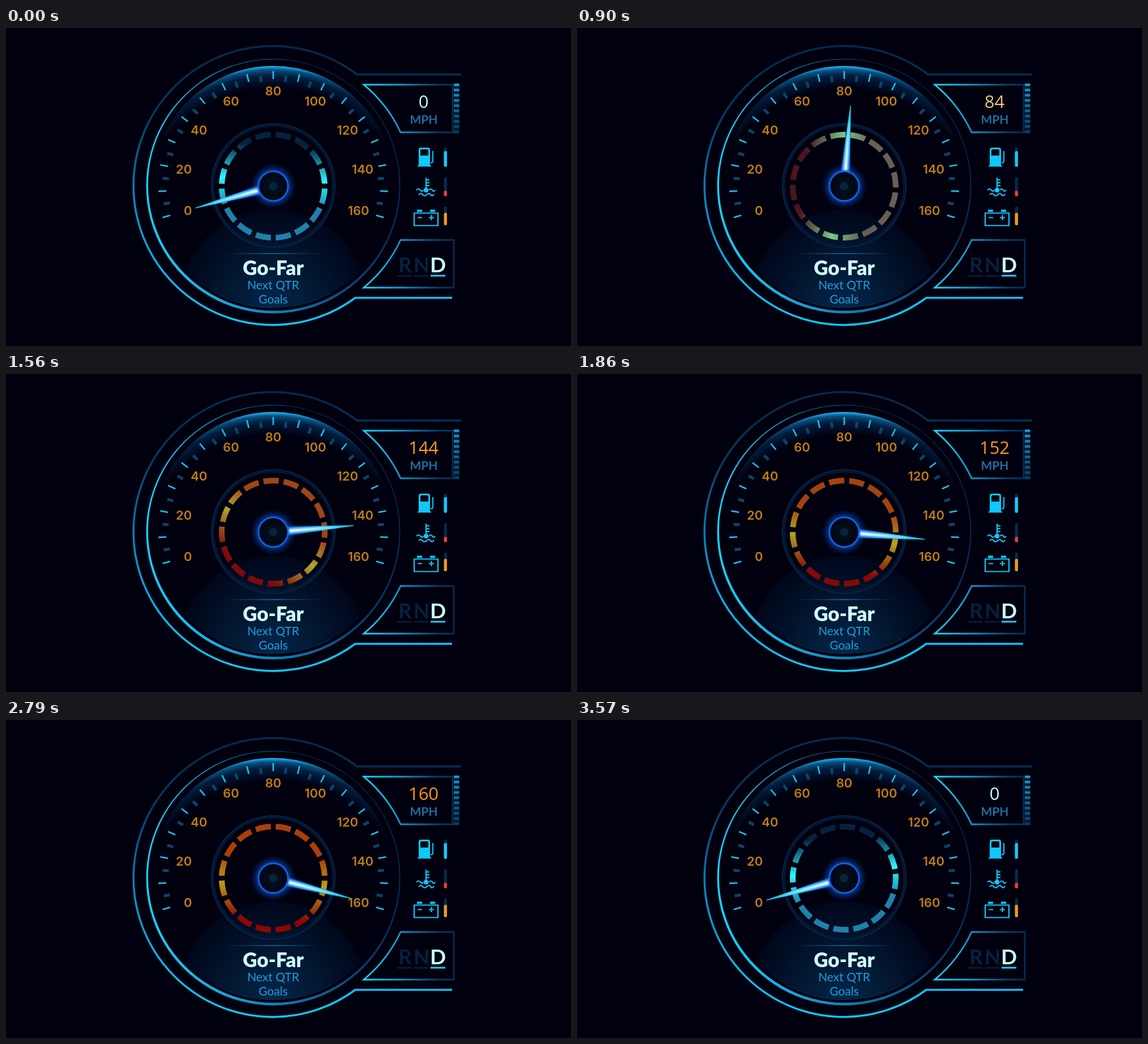
Animation of 998x561 px, one loop 3600 ms. Source, as an HTML page:

```html
<!DOCTYPE html>
<html lang="en">
<head>
<meta charset="utf-8">
<title>Speedometer</title>
<style>
  html, body { margin: 0; width: 100%; height: 100%; overflow: hidden; background: #00000f; }
  svg { display: block; }
  text { font-family: Lato, sans-serif; text-anchor: middle; }
  #labels text { font: 600 22px Inter, sans-serif; fill: #bd7d18; }
  #speed { font: 31px "Open Sans", sans-serif; }
  .line { fill: none; }
  .cyan { fill: none; stroke: #0fc8ff; }
  .solid { fill: #0fc8ff; }
</style>
</head>
<body>
<svg width="998" height="561" viewBox="0 0 998 561">
  <defs>
    <linearGradient id="frame" gradientUnits="userSpaceOnUse" x1="0" y1="32" x2="0" y2="524">
      <stop stop-color="#05284a"/><stop offset=".25" stop-color="#07395f"/>
      <stop offset=".55" stop-color="#0c86c0"/><stop offset=".85" stop-color="#0cbcf4"/>
      <stop offset="1" stop-color="#0ccaff"/>
    </linearGradient>
    <linearGradient id="rim" gradientUnits="userSpaceOnUse" x1="248" y1="300" x2="696" y2="270">
      <stop stop-color="#19d0ff"/><stop offset=".2" stop-color="#14b4ea"/>
      <stop offset=".55" stop-color="#0c74ac"/><stop offset=".85" stop-color="#073a68"/>
      <stop offset="1" stop-color="#06294e"/>
    </linearGradient>
    <radialGradient id="topGlow" gradientUnits="userSpaceOnUse" cx="472" cy="351" r="284">
      <stop offset=".86" stop-color="#00000f"/><stop offset=".94" stop-color="#021c3c"/>
      <stop offset=".976" stop-color="#08507f"/><stop offset=".993" stop-color="#169ad8"/>
      <stop offset="1" stop-color="#30c4f8"/>
    </radialGradient>
    <radialGradient id="dome" gradientUnits="userSpaceOnUse" cx="472" cy="486" r="166">
      <stop stop-color="#04264a"/><stop offset=".5" stop-color="#021730"/><stop offset="1" stop-color="#01061a"/>
    </radialGradient>
    <radialGradient id="hubGlow">
      <stop offset=".6" stop-color="#0b56dc"/><stop offset=".76" stop-color="#0a3c90" stop-opacity=".5"/>
      <stop offset="1" stop-color="#06247a" stop-opacity="0"/>
    </radialGradient>
    <linearGradient id="divider">
      <stop stop-color="#0b4f80" stop-opacity="0"/><stop offset=".5" stop-color="#0d5c90"/>
      <stop offset="1" stop-color="#0b4f80" stop-opacity="0"/>
    </linearGradient>
    <linearGradient id="panel" gradientUnits="userSpaceOnUse" x1="632" y1="0" x2="796" y2="0">
      <stop stop-color="#1cd4ff"/><stop offset=".42" stop-color="#0f93c8"/>
      <stop offset=".8" stop-color="#073c66"/><stop offset="1" stop-color="#062a4e"/>
    </linearGradient>
    <linearGradient id="blade" gradientUnits="userSpaceOnUse" x1="0" y1="-24" x2="0" y2="-143">
      <stop stop-color="#0c62f0"/><stop offset=".3" stop-color="#10a0ee"/>
      <stop offset=".65" stop-color="#1fc8ec"/><stop offset="1" stop-color="#20c4e4"/>
    </linearGradient>
    <linearGradient id="ringFill" gradientUnits="userSpaceOnUse" x1="0" y1="-96" x2="0" y2="96">
      <stop offset=".12"/><stop offset=".44"/><stop offset=".7"/>
    </linearGradient>
    <filter id="soft" x="-200%" width="500%"><feGaussianBlur stdDeviation="1.5"/></filter>
    <clipPath id="face"><circle cx="472" cy="281" r="213"/></clipPath>
  </defs>

  <!-- Dial -->
  <path class="line" stroke="url(#frame)" stroke-width="3.5" d="M804 82H620A246 246 0 1 0 617 476H788"/>
  <path fill="url(#rim)" fill-rule="evenodd"
    d="M472 54.500a224.500 224.500 0 1 0 .1 0zM472.800 55.200a221.800 221.800 0 1 1-.1 0z"/>
  <circle cx="472" cy="281" r="214" fill="url(#topGlow)"/>
  <g clip-path="url(#face)">
    <circle cx="472" cy="486" r="166" fill="url(#dome)"/>
    <path class="line" stroke="#042c54" stroke-width="2" d="M370 468A213 213 0 0 0 574 468"/>
  </g>
  <circle cx="472" cy="278" r="109" fill="none" stroke="#06264a" stroke-width="2.200"/>
  <circle cx="472" cy="278" r="106" fill="none" stroke="#031531" stroke-width="4"/>
  <g id="ticks" transform="translate(472 279)"></g>
  <g id="labels" transform="translate(472 287)"></g>
  <rect x="385" y="397" width="175" height="2" fill="url(#divider)"/>
  <text x="472" y="436" font-size="35" font-weight="900" fill="#cffcff">Go-Far</text>
  <g font-size="21" fill="#1d9fda">
    <text x="472" y="461">Next QTR</text><text x="472" y="486">Goals</text>
  </g>

  <!-- Side panels -->
  <g class="line" stroke="url(#panel)" stroke-width="2.800">
    <path d="M801 184H697A242 242 0 0 0 632 100H789V184"/>
    <path d="M791 374H697A242 242 0 0 1 632 458H791Z"/>
  </g>
  <g id="rungs"></g>
  <text id="speed" x="737.500" y="141"></text>
  <text x="738" y="169" font-size="21" font-weight="700" fill="#1f6e9b">MPH</text>
  <g font-size="37" font-weight="700" fill="#06203e">
    <text x="705" y="431">R</text><text x="734" y="431">N</text>
    <text x="763" y="431" fill="#c8fdff">D</text>
    <path d="M691 436h26v2.400h-26zM721 436h25v2.400h-25z"/>
    <path fill="#18cfff" d="M750 435.500h26v3h-26z"/>
  </g>

  <!-- Status icons -->
  <path class="solid" fill-rule="evenodd"
    d="M729 244V215q0-4 4-4h12q4 0 4 4V244zM732 216v9h14v-9q0-2-2-2h-10q-2 0-2 2z"/>
  <path class="cyan" stroke-width="2" d="M727 243.500h24M750 237q4 2 4-3V217"/>
  <g class="cyan" stroke-width="2.200">
    <path d="M742 264v22M742 268h6M742 273h6M742 278h6"/>
    <path d="M725 286q4-4 7 0t5 0M747 286q4-4 6 0t5 0M729 294q4-4 7 0t7 0 7 0 6-1"/>
    <path d="M721 326.500h42V348.500h-42zM727 334.500h8M747 334.500h9M751.500 330v9"/>
  </g>
  <circle class="solid" cx="742" cy="286" r="4.300"/>
  <path class="solid" d="M726 320.500h9v4h-9zM749 320.500h9v4h-9z"/>
  <g id="bars"></g>

  <!-- Moving parts -->
  <g id="ring">
    <circle r="91" fill="none" stroke="url(#ringFill)" stroke-width="10" transform="rotate(2.750)"
      pathLength="576" stroke-dasharray="27.200 8.800"/>
  </g>
  <circle cx="472" cy="279" r="41" fill="url(#hubGlow)"/>
  <g id="needle">
    <path fill="#0b62e8" opacity=".5" filter="url(#soft)" d="M-9-22L0-135 9-22z"/>
    <path fill="url(#blade)" d="M-7.500-24L-.6-143H.6L7.500-24z"/>
    <path fill="#e4ffff" filter="url(#soft)" d="M-3.600-28L0-120 3.600-28z"/>
  </g>
  <g transform="translate(472 279)">
    <circle r="26" fill="#010814" stroke="#0e64f4" stroke-width="2.600"/>
    <circle r="17" fill="#020c1a"/><circle r="7.500" fill="#082338"/>
  </g>
</svg>
<script>
const byId = id => document.getElementById(id);
const LOOP = 3600, TOP_SPEED = 160;
const SWEEP = 105.8;
const needleAngle = speed => SWEEP * (2 * speed / TOP_SPEED - 1);

// Linear motion through [time, value] points.
const speedPath = [[0, 0], [1620, 150], [2910, TOP_SPEED], [3570, 0], [LOOP, 0]];
const spinPath = [[0, 0], [1890, 180], [2910, 180], [LOOP, 0]];

const lerp = (a, b, k) => a + (b - a) * k;
function follow(path, t) {
  const i = path.findIndex(([time]) => time > t);
  const [[t0, v0], [t1, v1]] = [path[i - 1], path[i]];
  return lerp(v0, v1, (t - t0) / (t1 - t0));
}

// Colours at rest and at top speed.
const mix = (cold, hot) => k => `rgb(${cold.map((c, i) => Math.round(lerp(c, hot[i], k)))})`;
const ringColours = [
  mix([4, 34, 64], [140, 8, 4]),
  mix([46, 244, 255], [186, 158, 24]),
  mix([32, 128, 172], [170, 64, 8])
];
const digitColour = mix([200, 253, 255], [255, 146, 16]);

const repeat = (count, draw) => Array.from({ length: count }, (_, i) => draw(i)).join('');

byId('ticks').innerHTML = repeat(33, i => {
  const shape = i % 2
    ? 'd="M0-196v11" stroke="#0a4468" stroke-width="5"'
    : 'd="M0-203v14" stroke="#16c6f6" stroke-width="2.6"';
  return `<path ${shape} transform="rotate(${needleAngle(i * 5)})"/>`;
});

byId('labels').innerHTML = repeat(9, i => {
  const a = needleAngle(i * 20) * Math.PI / 180;
  const radius = 159 + 9 * Math.cos(a);
  return `<text x="${radius * Math.sin(a)}" y="${-radius * Math.cos(a)}">${i * 20}</text>`;
});

byId('rungs').innerHTML = '<path fill="#031a34" d="M791 98h10v87h-10z"/>' + repeat(10, i =>
  `<rect x="791" y="${98 + i * 9.2}" width="9.5" height="4.4" fill="#1a9ccc" opacity="${1 - i * .08}"/>`);

const bar = (top, level, bottom, colour) => [[top, '#07294c'], [level, colour]].map(([y, fill]) =>
  `<rect x="773.5" y="${y}" width="5.5" height="${bottom - y}" rx="2.7" fill="${fill}"/>`).join('');
byId('bars').innerHTML = bar(211, 217, 245, '#12c8fc') + bar(263, 287, 297, '#f0393c') +
  bar(315, 326, 348, '#e99a16');

const stops = byId('ringFill').children;
const turn = (id, angle) => byId(id).setAttribute('transform', `translate(472 279) rotate(${angle})`);

function draw(now) {
  const t = now % LOOP;
  const speed = follow(speedPath, t);
  const heat = speed / TOP_SPEED;
  ringColours.forEach((colour, i) => stops[i].setAttribute('stop-color', colour(heat)));
  turn('ring', -follow(spinPath, t));
  turn('needle', needleAngle(speed));
  byId('speed').textContent = Math.round(speed / 4) * 4;
  byId('speed').setAttribute('fill', digitColour(heat));
}

const begin = performance.now();
function frame() {
  draw(performance.now() - begin);
  requestAnimationFrame(frame);
}
frame();
</script>
</body>
</html>
```
